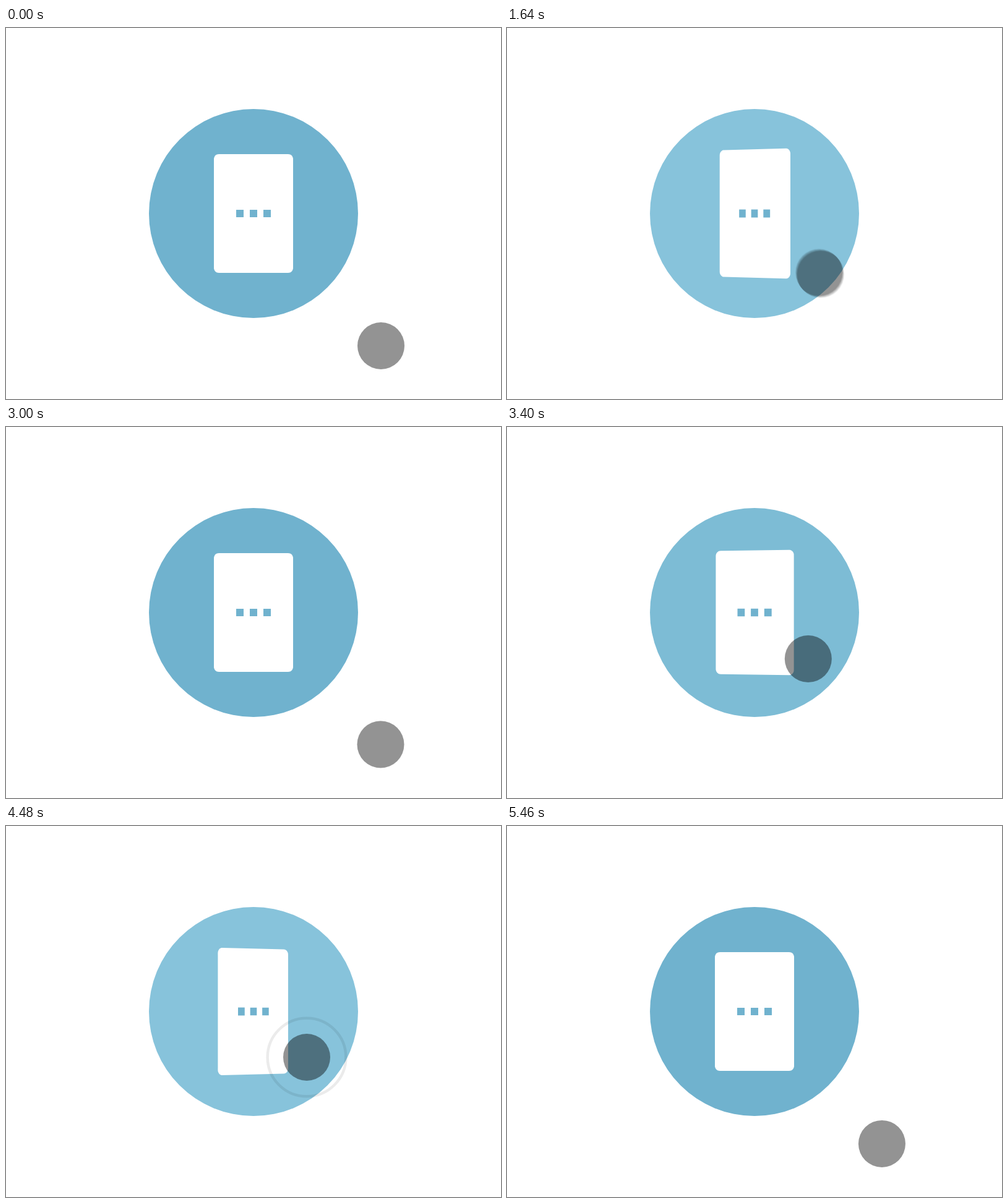
Recreate the animation shown at these times as an HTML page with a canvas. Size 800 by 600 pixels, loop 5780 ms.

```html
<!DOCTYPE html>
<html lang="en">
<head>
<meta charset="utf-8">
<title>Card hover and flip</title>
<style>
html, body { margin: 0; width: 100%; height: 100%; overflow: hidden; background: #fff; }
canvas { display: block; }
</style>
</head>
<body>
<canvas id="stage" width="800" height="600"></canvas>
<script>
const LOOP = 5780, STEP = 20, DEPTH = 2600, SHADE = 0.42;
const BASE = [112, 178, 206], LIGHT = [135, 195, 219];
const SAMPLES = 15, SHUTTER = 10;

const ctx = document.getElementById('stage').getContext('2d');
const blur = document.createElement('canvas');
blur.width = 800;
blur.height = 600;
const blurCtx = blur.getContext('2d');

const mix = (a, b, k) => a + (b - a) * k;
const span = (t, from, to) => Math.min(1, Math.max(0, (t - from) / (to - from)));
const smooth = k => k * k * (3 - 2 * k);

// Symmetric cubic-bezier(.83, 0, .17, 1)
function sharp(k) {
  let lo = 0, hi = 1;
  for (let i = 0; i < 24; i++) {
    const s = (lo + hi) / 2, r = 1 - s;
    const x = 3 * r * r * s * 0.83 + 3 * r * s * s * 0.17 + s * s * s;
    if (x < k) lo = s; else hi = s;
  }
  return smooth(lo);
}

const sharpSpan = (t, from, to) => sharp(span(t, from, to));
const smoothSpan = (t, from, to) => smooth(span(t, from, to));

function pointer(t) {
  const k = sharpSpan(t, 340, 840) - sharpSpan(t, 1448, 1948)
          + sharpSpan(t, 2960, 3460) - sharpSpan(t, 4980, 5480);
  return [mix(606, 486, k), mix(514, 374, k)];
}

function disc(c, x, y, r) {
  c.beginPath();
  c.arc(x, y, r, 0, 2 * Math.PI);
}

// Fills a rounded rectangle lying in the card's plane, seen in perspective.
function plate(x, y, w, h, r, angle, scale, fill) {
  const corners = [[w - r, h - r], [r, h - r], [r, r], [w - r, r]];
  const n = r ? 8 : 0;
  ctx.beginPath();
  corners.forEach(([cx, cy], i) => {
    for (let j = 0; j <= n; j++) {
      const a = (i + (n ? j / n : 0)) * Math.PI / 2;
      const px = (x + cx + r * Math.cos(a)) * scale;
      const py = (y + cy + r * Math.sin(a)) * scale;
      const zoom = DEPTH / (DEPTH - px * Math.sin(angle));
      ctx.lineTo(400 + px * Math.cos(angle) * zoom, 300 + py * zoom);
    }
  });
  ctx.fillStyle = fill;
  ctx.fill();
}

function drawPointer(t) {
  blurCtx.clearRect(0, 0, 800, 600);
  blurCtx.globalCompositeOperation = 'lighter';
  blurCtx.fillStyle = '#000';
  blurCtx.globalAlpha = 1 / SAMPLES;
  for (let i = 0; i < SAMPLES; i++) {
    disc(blurCtx, ...pointer(t + SHUTTER * i / (SAMPLES - 1)), 38);
    blurCtx.fill();
  }
  ctx.globalAlpha = SHADE;
  ctx.drawImage(blur, 0, 0);
  ctx.globalAlpha = 1;
}

function drawRing(t) {
  const k = span(t, 3830, 4630);
  if (k <= 0 || k >= 1) return;
  disc(ctx, 486, 374, mix(38, 63.5, 1 - (1 - k) ** 3));
  ctx.lineWidth = 4.5;
  ctx.strokeStyle = `rgba(0,0,0,${SHADE * (1 - k)})`;
  ctx.stroke();
}

function draw(t) {
  const first = smoothSpan(t, 440, 1040) - smoothSpan(t, 1640, 2040);
  const second = smoothSpan(t, 3060, 3680);
  const glow = first + second - smoothSpan(t, 5180, 5480);
  const grow = first + second - sharpSpan(t, 4110, 4930);
  const tilt = 34.5 * (first + second) + 145.5 * sharpSpan(t, 4110, 4760);
  const angle = tilt * Math.PI / 180, scale = 1 + 0.083 * grow;

  ctx.fillStyle = '#fff';
  ctx.fillRect(0, 0, 800, 600);
  disc(ctx, 400, 300, 169);
  ctx.fillStyle = `rgb(${BASE.map((c, i) => Math.round(mix(c, LIGHT[i], glow)))})`;
  ctx.fill();

  plate(-64, -96, 128, 192, 8, angle, scale, '#fff');
  for (const x of [-28, -6, 16]) plate(x, -6, 12, 12, 0, angle, scale, `rgb(${BASE})`);

  drawRing(t);
  drawPointer(t);
}

const start = performance.now();
function tick() {
  const t = (performance.now() - start) % LOOP;
  draw(Math.floor(t / STEP) * STEP);
  requestAnimationFrame(tick);
}
tick();
</script>
</body>
</html>
```
